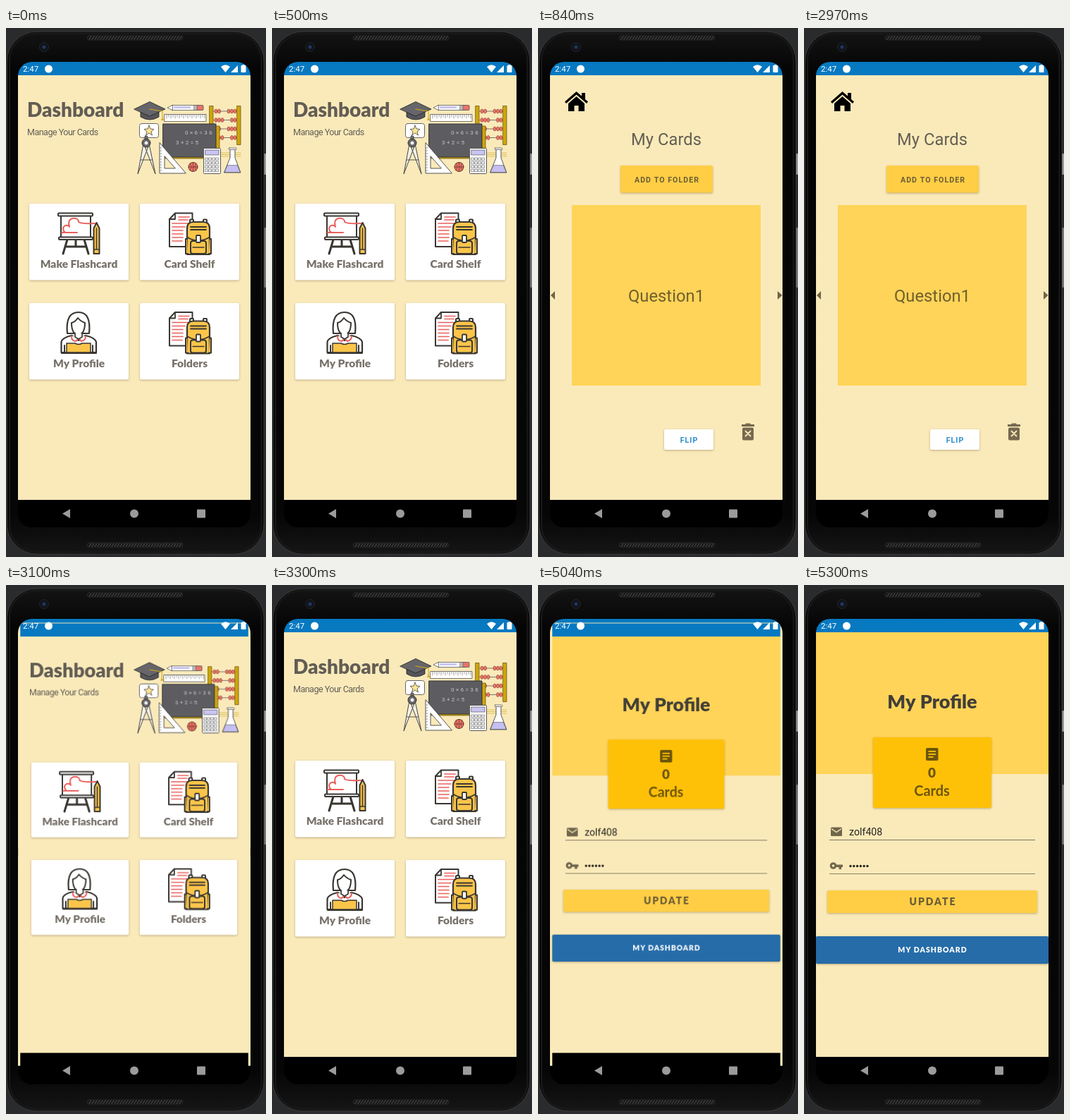
An HTML page with a canvas that plays this animation: 369 px wide and 750 px high, repeating every 8 s.

```html
<!DOCTYPE html>
<html lang="en">
<head>
<meta charset="utf-8">
<title>Flashcards</title>
<style>
html, body { margin: 0; width: 100%; height: 100%; overflow: hidden; background: #2a2b2d; }
canvas { display: block; width: 369px; height: 750px; }
</style>
</head>
<body>
<canvas id="stage"></canvas>
<script>
const W = 369, H = 750, LOOP = 8000;
const CREAM = '#faeaba', AMBER = '#ffd458', BUTTON = '#ffce45', BLUE = '#0679c1';
const INK = '#393632', GOLD = '#fbc54a', RED = '#e9605c', BROWN = '#6b5d36';
const MID_X = 182, MID_Y = 378;

let g;

function makeLayer(paint) {
  const c = document.createElement('canvas');
  c.width = W;
  c.height = H;
  g = c.getContext('2d');
  g.lineJoin = g.lineCap = 'round';
  paint();
  return c;
}

function box(x, y, w, h, color, r = 0, edge, lw = 1) {
  g.beginPath();
  g.roundRect(x, y, w, h, r);
  if (color) { g.fillStyle = color; g.fill(); }
  if (edge) { g.strokeStyle = edge; g.lineWidth = lw; g.stroke(); }
}

function raised(x, y, w, h, color) {
  g.save();
  g.shadowColor = 'rgba(70,50,0,.35)';
  g.shadowBlur = 3;
  g.shadowOffsetY = 1;
  box(x, y, w, h, color, 2);
  g.restore();
}

function shape(d, fill, edge, lw = 1) {
  const p = new Path2D(d);
  if (fill) { g.fillStyle = fill; g.fill(p, 'evenodd'); }
  if (edge) { g.strokeStyle = edge; g.lineWidth = lw; g.stroke(p); }
}

function dot(x, y, r, fill, edge, lw = 1) {
  g.beginPath();
  g.arc(x, y, r, 0, 7);
  if (fill) { g.fillStyle = fill; g.fill(); }
  if (edge) { g.strokeStyle = edge; g.lineWidth = lw; g.stroke(); }
}

function text(str, x, y, font, color, align = 'left', spacing = 0) {
  g.font = font + ', sans-serif';
  g.fillStyle = color;
  g.textAlign = align;
  g.letterSpacing = spacing + 'px';
  g.fillText(str, align === 'center' ? x + spacing / 2 : x, y);
}

function windowBase() {
  box(17, 48, 330, 660, CREAM);
  box(17, 48, 330, 19, BLUE);
  box(17, 669, 330, 39, '#000');
}

// Dashboard

function gradCap() {
  shape('M191 117V126Q204 134 217 126V117Z', '#55555a', '#222', .8);
  shape('M182 115L204 104.500L226 115L204 125Z', '#65656a', '#222', .8);
  shape('M204 115L222 118V127', null, '#d9aa13', 1.2);
  shape('M222 126L220 131H224Z', '#d9aa13');
}

function compass() {
  shape('M195 164L187 207L202 168ZM203 164L212 207L197 168Z', '#f5f1e6', '#444', 1);
  shape('M191 187H208', null, '#555');
  box(197, 153, 4, 8, '#77777c', 1, '#333', .8);
  dot(199, 163, 6, '#66666b', '#333');
  dot(199, 163, 2.5, '#eee');
}

function abacus() {
  for (let i = 0; i < 4; i++) {
    const y = 118 + i * 12.5;
    shape(`M294 ${y}H329`, null, '#777', 1);
    for (let j = 0; j < 5; j++) {
      const x = 298 + j * 4.5 + (j > 1 + i % 2 ? 9 : 0);
      g.beginPath();
      g.ellipse(x, y, 2, 3, 0, 0, 7);
      g.fillStyle = '#ee7a68';
      g.fill();
      g.strokeStyle = '#88372f';
      g.lineWidth = .6;
      g.stroke();
    }
  }
  for (const x of [289, 328]) box(x, 110.500, 5, 55, '#cfa50d', 0, '#6d590e', .8);
}

function supplies() {
  gradCap();
  box(236, 109.500, 38, 7, '#fff', 0, '#555', .8);
  box(238, 111, 24, 3, '#c9c4f2');
  box(270, 109.500, 10, 7, '#e8736c', 1, '#555', .8);
  box(267, 109.500, 4, 7, '#bbb', 0, '#555', .6);
  shape('M236 109.500L229 113L236 116.500Z', '#fff', '#555', .8);

  box(225, 122.500, 59, 10, '#fff', 0, '#555', .8);
  for (let x = 228; x < 283; x += 3) shape(`M${x} 123V${x % 2 ? 126 : 128}`, null, '#777', .7);

  abacus();
  box(226, 139, 77, 46, '#cfa50d', 0, '#6d590e', .8);
  box(223, 136, 75, 47, '#5d5d61', 0, '#333', 1);
  text('0×6=36', 254, 151, '8px Roboto', '#c9c9c9', 'left', 2.4);
  text('3+2=5', 241, 165, '8px Roboto', '#c9c9c9', 'left', 2.4);

  box(189.500, 135.500, 27, 20, '#fff', 3, '#666', 1);
  shape('M203 138L205 143L210 143.500L206 147L207.500 152L203 149L198.500 152L200 147L196 143.500L201 143Z', '#ffe493', '#444', .8);
  compass();
  shape('M218 163V206H255ZM225 182V199H240Z', '#fff', '#555', 1);
  for (let y = 170; y < 203; y += 4) shape(`M218 ${y}h3`, null, '#777', .7);

  dot(265.500, 197, 6.5, '#ef7465', '#613029', 1);
  shape('M259 197H272M265.500 191V203M261 192Q265 197 261 202M270 192Q266 197 270 202', null, '#613029', .7);

  for (let y = 177; y < 183; y += 2.5) shape(`M304 ${y}H333`, null, '#d1ae38', .7);
  box(280.500, 170.500, 24, 36, '#fff', 1, '#555', 1);
  box(283, 173, 19, 7, '#c9c4f2', 0, '#555', .7);
  for (let i = 0; i < 16; i++)
    box(283 + i % 4 * 5, 184 + (i >> 2) * 5.4, 3.5, 3.5, '#eee', 0, '#666', .6);
  shape('M318 171V184L309.500 205H333L325 184V171Z', '#fff', '#555', 1);
  shape('M314 195L310 204.500H332.500L328.500 195Z', '#c5bff2', '#555', .7);
  box(316, 170, 11, 2.5, '#eee', 1, '#555', .7);
}

function easel() {
  shape('M87 300L81 320M111 300L117 320M99 300V309M85 310H113', null, INK, 3);
  box(78, 266, 42, 31, '#fff', 0, INK, 2);
  box(74, 262.500, 49, 4, '#fff', 1, INK, 2);
  box(75, 296.500, 48, 3.5, '#fff', 1, INK, 2);
  shape('M79 290H84Q78 284 84 280Q89 279 90 282Q87 272 94 270Q103 269 103 275Q107 278 126 277M84 290H101', null, RED, 2);
  shape('M124.500 284L128.500 276L132.500 284V320H124.500Z', GOLD, INK, 2);
  shape('M128.500 284V313M125 314H132', null, INK, 1.5);
}

function backpack() {
  shape('M240 262.500H264.500V310H232V271Z', '#fff', INK, 2);
  shape('M240 263V271H232', null, INK, 1.8);
  shape('M245 268H260M245 272H258M236 277H260M236 282H254M236 287H251M236 292H251M236 297H251M236 302H250', null, RED, 1.7);
  box(261, 271.500, 5, 5, '#fff', 1, INK, 2);
  box(280, 271.500, 5, 5, '#fff', 1, INK, 2);
  shape('M257 321V284Q257 275 266 275H280Q289 275 289 284V321Z', GOLD, INK, 2.2);
  shape('M257 299H255V320H258M289 299H291V320H288', GOLD, INK, 2);
  shape('M262 282H284M262 286H284M258 297Q273 306 288 297', null, INK, 1.8);
  box(262, 302, 22, 18, GOLD, 3, INK, 2);
  box(270, 294, 6, 10, '#fff', 1, INK, 1.8);
  shape('M265 311H281', null, INK, 1.5);
}

function student() {
  shape('M87 433Q84 403 103 403Q121 403 118 433Z', '#fff', INK, 2.2);
  shape('M78.500 460V445Q80 439 93 436L103 443L113 436Q126 439 128 445V460Z', '#fff', INK, 2.2);
  shape('M93 418Q93 434 102.500 435Q112 434 112 418Q106 416 102 411Q98 417 93 418Z', '#fff', INK, 2);
  shape('M93 437Q93 444 99 444L103 440L107 444Q113 443 113 437', '#fff', RED, 2);
  shape('M98 433V438L103 441L108 438V433', '#fff', INK, 1.7);
  shape('M86 447H98Q103 450 108 447H120V460H86Z', GOLD, INK, 1.5);
  shape('M83 461V450M123 461V450M79 461H128', null, INK, 2);
}

function dashboard() {
  windowBase();
  text('Dashboard', 30, 126, '900 28px Lato', '#625d54');
  text('Manage Your Cards', 30, 152, '12.5px Roboto', '#625d54', 'left', -.5);
  supplies();
  const tiles = [
    [33, 249, 'Make Flashcard'], [190, 249, 'Card Shelf'],
    [33, 390, 'My Profile'], [190, 390, 'Folders']
  ];
  for (const [x, y, name] of tiles) {
    raised(x, y, 141, 108.500, '#fff');
    text(name, x + 70.5, y + 91, '900 15.5px Lato', '#777169', 'center');
  }
  easel();
  backpack();
  g.save();
  g.translate(0, 140.500);
  backpack();
  g.restore();
  student();
}

// Card viewer

function cards() {
  windowBase();
  shape('M54.500 90L62 96.500V92H67V101L71 104.500L69 107L54.500 94.500L40 107L38 104.500Z', '#000');
  shape('M54.500 97L66 107V118H57.500V110H51.500V118H43V107Z', '#000');
  text('My Cards', MID_X, 166, '23.8px Roboto', '#655f53', 'center');
  raised(117, 195, 131, 38.500, BUTTON);
  text('ADD TO FOLDER', 182.500, 219, 'bold 10.7px Roboto', BROWN, 'center', 1);
  box(48, 251, 268, 256, AMBER);
  text('Question1', MID_X, 388, '23.8px Roboto', '#705f2e', 'center');
  shape('M24 373V385L18 379Z', '#6f6449');
  shape('M340 373V385L346.500 379Z', '#6f6449');
  raised(179, 569, 70, 29, '#fff');
  text('FLIP', 214, 588, 'bold 10.7px Roboto', '#2d8dc8', 'center', 1);
  shape('M289 562H294L295 560.500H301L302 562H307V565H289Z', '#76694f');
  box(290, 566.500, 16, 18, '#76694f', 2);
  shape('M294.500 571.500L301.500 578.500M301.500 571.500L294.500 578.500', null, CREAM, 1.8);
}

// Profile

function profile() {
  windowBase();
  box(17, 67, 330, 201, AMBER);
  text('My Profile', MID_X, 175, '900 27px Lato', '#413e38', 'center');
  raised(98, 216, 168, 100, '#ffc107');
  const dark = '#6c550b';
  box(173, 231, 17.5, 18, dark, 2);
  box(176.500, 235, 10.5, 1.8, '#ffc107');
  box(176.500, 239, 10.5, 1.8, '#ffc107');
  box(176.500, 243, 7, 1.8, '#ffc107');
  text('0', 181.500, 273, '900 19px Lato', dark, 'center');
  text('Cards', 181.500, 299, 'bold 20px Lato', dark, 'center');

  const gray = '#70664c';
  box(38, 343.500, 16, 12.5, gray, 1.5);
  shape('M39.500 346L46 350.500L52.500 346', null, CREAM, 1.5);
  text('zolf408', 64, 355, '14.2px Roboto', '#29261f');
  box(36, 361, 292, 1, '#7d7359');
  dot(41.500, 398, 3.3, null, gray, 3);
  shape('M45 396.500H55V400H53V403H49.500V400H45Z', gray);
  for (let i = 0; i < 6; i++) dot(66 + i * 4.8, 398.500, 1.7, '#29261f');
  box(36, 409, 292, 1, '#8d8265');

  raised(33, 433, 298, 32, BUTTON);
  text('UPDATE', MID_X, 454, '900 14px Lato', BROWN, 'center', 2);
  raised(17, 498, 330, 39, '#266ca9');
  text('MY DASHBOARD', MID_X, 521, '900 10.5px Lato', '#fff', 'center', 1);
}

// Phone

function grille(y) {
  box(115, y, 136, 6, '#171717', 3, '#292929', 1);
  for (let x = 118; x < 248; x += 4) shape(`M${x} ${y + 5}l3 -4`, null, '#555', 1);
}

function phone() {
  box(0, 0, W, H, '#2a2b2d');
  box(366, 178, 3, 30, '#9a9a9a', 1);
  box(366, 283, 3, 85, '#77787a', 1);
  const shade = g.createLinearGradient(0, 0, 0, H);
  shade.addColorStop(0, '#151515');
  shade.addColorStop(.08, '#050505');
  shade.addColorStop(.92, '#060606');
  shade.addColorStop(1, '#171717');
  box(1.500, 5, 364.5, 741, shade, 42, '#3a3a3b', 1);
  box(5, 8, 357.5, 735, null, 38, '#191919', 2);
  grille(11);
  grille(730);
  dot(54, 27, 6.5, '#10131a', '#242529', 1);
  dot(54, 27, 2.5, '#20385f');
}

function systemBars() {
  text('2:47', 24, 62, '11.5px Roboto', '#fff');
  dot(60.500, 58, 5.5, '#fff');
  shape('M305 55Q311.500 49.500 318 55L311.500 63Z', '#fff');
  shape('M329 53V63H319Z', '#fff');
  box(333.500, 53, 7, 10, '#fff', 1);
  box(335.500, 52, 3, 2, '#fff');
  shape('M91 682V695L80 688.500Z', '#9b9b9b');
  dot(182, 688.500, 6, '#9b9b9b');
  box(271, 682.500, 12, 12, '#9b9b9b', 1);
}

const body = makeLayer(phone), bars = makeLayer(systemBars);
const home = makeLayer(dashboard), viewer = makeLayer(cards), account = makeLayer(profile);

// Each move: start, end, first step, old and new screen.
const moves = [
  [500, 840, 0, home, viewer],
  [2970, 3300, 0, viewer, home],
  [4970, 5300, 1, home, account]
];

const bez = (u, a, b, c, d) =>
  (1 - u) ** 3 * a + 3 * (1 - u) ** 2 * u * b + 3 * (1 - u) * u * u * c + u ** 3 * d;

// Fast-out, extra-slow-in curve made of two cubics.
function ease(x) {
  const [xs, ys] = x < 1 / 6
    ? [[0, .05, .1333, 1 / 6], [0, 0, .06, .4]]
    : [[1 / 6, .2083, .25, 1], [.4, .82, 1, 1]];
  let lo = 0, hi = 1;
  for (let i = 0; i < 24; i++) {
    const m = (lo + hi) / 2;
    if (bez(m, ...xs) < x) lo = m; else hi = m;
  }
  return bez(lo, ...ys);
}

const stage = document.getElementById('stage');
const view = stage.getContext('2d');
const dpr = window.devicePixelRatio || 1;
stage.width = W * dpr;
stage.height = H * dpr;

function place(layer, scale, alpha) {
  view.save();
  view.globalAlpha = alpha;
  view.translate(MID_X, MID_Y);
  view.scale(scale, scale);
  view.translate(-MID_X, -MID_Y);
  view.drawImage(layer, 0, 0);
  view.restore();
}

function render(t) {
  view.setTransform(dpr, 0, 0, dpr, 0, 0);
  view.drawImage(body, 0, 0);
  view.save();
  view.beginPath();
  view.roundRect(17, 48, 330, 660, 20);
  view.clip();
  let now = home, move = null;
  for (const m of moves) {
    if (t >= m[1]) now = m[4];
    else if (t >= m[0]) move = m;
  }
  if (move) {
    const [start, , first, from, to] = move;
    const ms = (Math.floor((t - start) / 65) + first) * 200 / 3;
    const p = ease(Math.min(1, ms / 400));
    const alpha = Math.min(1, Math.max(0, (ms - 40) / 83));
    place(from, 1 + .05 * p, 1);
    place(to, .85 + .15 * p, alpha);
  } else {
    place(now, 1, 1);
  }
  view.drawImage(bars, 0, 0);
  view.restore();
}

const t0 = performance.now();
function tick() {
  render((performance.now() - t0) % LOOP);
  requestAnimationFrame(tick);
}
tick();
</script>
</body>
</html>
```
